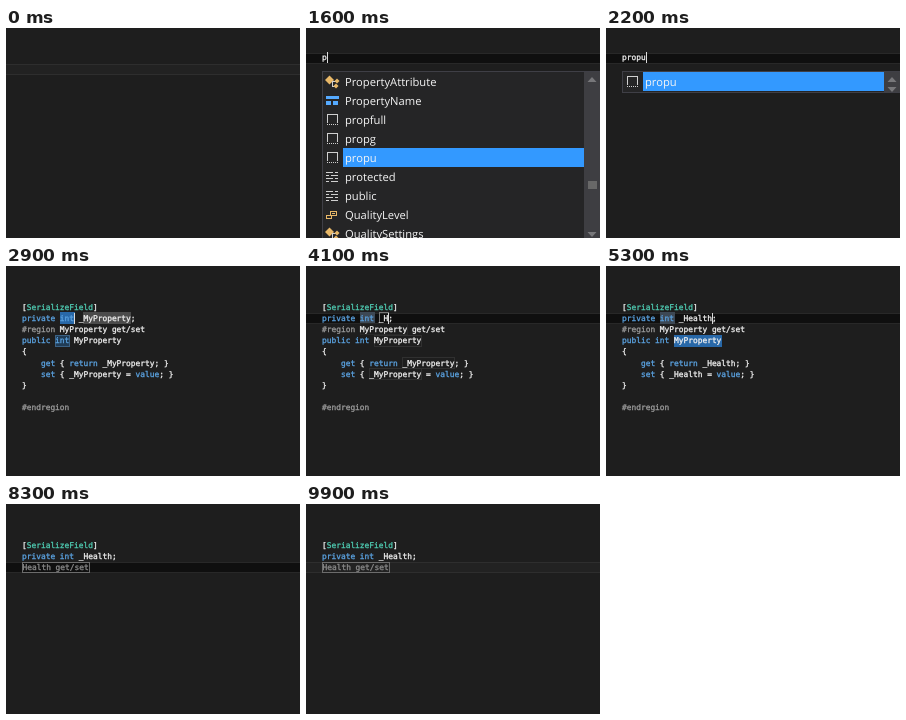
These frames come from a looping animation (294 by 210 pixels, 10000 ms). An HTML page with a canvas:

```html
<!DOCTYPE html>
<html lang="en">
<head>
<meta charset="utf-8">
<title>Property snippet</title>
<style>
  html, body { margin: 0; width: 100%; height: 100%; overflow: hidden; background: #1e1e1e; }
  canvas { display: block; }
</style>
</head>
<body>
<canvas id="stage" width="294" height="210"></canvas>
<script>
const ctx = document.getElementById('stage').getContext('2d');
const LOOP = 10000, LEFT = 16, CHAR = 4.73, LINE = 11.2;
const WHITE = '#f0f0f0', BLUE = '#5ba3e2', TEAL = '#4ec9b0', GRAY = '#9b9b9b';
const SELECTED = '#2868a8', FIELD = '#3d4854';
const ITEMS = [
  ['PropertyAttribute', 'class'], ['PropertyName', 'struct'],
  ['propfull', 'snippet'], ['propg', 'snippet'], ['propu', 'snippet'],
  ['protected', 'keyword'], ['public', 'keyword'],
  ['QualityLevel', 'enum'], ['QualitySettings', 'class']
];

const colX = col => LEFT + col * CHAR;
const lineY = (line, offset) => Math.round(offset + line * LINE);
const bandTop = line => lineY(line, 24.8);
const caretTop = line => lineY(line, 24.4);
const baseline = line => lineY(line, 32.4);
const between = (t, from, to) => t >= from && t < to;

function rect(x, y, w, h, color) {
  ctx.fillStyle = color;
  ctx.fillRect(x, y, w, h);
}

function outline(x, y, w, h, color) {
  ctx.strokeStyle = color;
  ctx.lineWidth = 1;
  ctx.strokeRect(x + .5, y + .5, w - 1, h - 1);
}

function text(str, x, y, color, font) {
  ctx.font = font;
  ctx.fillStyle = color;
  ctx.fillText(str, x, y);
}

// A thin stroke gives the small code text its weight
function code(line, str, col = 0, color = WHITE) {
  const x = colX(col), y = baseline(line);
  text(str, x, y, color, '7.86px "DejaVu Sans Mono", monospace');
  ctx.strokeStyle = color;
  ctx.lineWidth = 0.3;
  ctx.strokeText(str, x, y);
}

function colored(line, str, typesKnown) {
  const parts = str.split(/(#\w+|SerializeField|\b(?:private|public|int|return|value)\b|[gs]et(?= \{))/);
  let col = 0;
  parts.forEach((part, i) => {
    let color = WHITE;
    if (i % 2) color = part[0] === '#' ? GRAY : part[0] === 'S' ? (typesKnown ? TEAL : WHITE) : BLUE;
    code(line, part, col, color);
    col += part.length;
  });
}

function mark(line, col, length, fill, border) {
  const x = Math.round(colX(col)), w = Math.round(length * CHAR) + 1, y = bandTop(line) - 1;
  if (fill) rect(x, y, w, 12, fill);
  if (border) outline(x, y, w, 12, border);
}

function band(line, fill = '#0f0f0f', edge = '#282828') {
  rect(0, bandTop(line), 294, 11, edge);
  rect(0, bandTop(line) + 1, 294, 9, fill);
}

function idleBand(line) {
  band(line, '#222222', '#2e2e2e');
}

function caret(line, col) {
  rect(Math.round(colX(col)), caretTop(line), 1, 11, '#dcdcdc');
}

function diamond(x, y, r, color) {
  ctx.fillStyle = color;
  ctx.beginPath();
  ctx.moveTo(x, y - r); ctx.lineTo(x + r, y); ctx.lineTo(x, y + r); ctx.lineTo(x - r, y);
  ctx.fill();
}

function icon(kind, y) {
  const orange = '#e8b868', light = '#d0d0d0', sky = '#55aaff';
  if (kind === 'class') {
    diamond(23.5, y - 2, 4.5, orange);
    rect(26, y - 1, 4, 1, light);
    rect(26, y - 1, 1, 5, light);
    rect(26, y + 4, 3, 1, light);
    diamond(31, y - 1, 2.5, orange);
    diamond(30, y + 4, 2.5, orange);
  } else if (kind === 'struct') {
    rect(20, y - 5, 13, 3, sky);
    rect(20, y, 5, 4, sky);
    rect(27, y, 5, 4, sky);
  } else if (kind === 'snippet') {
    rect(21, y - 6, 11, 1, light);
    rect(21, y - 6, 1, 9, light);
    rect(31, y - 6, 1, 9, light);
    for (let x = 21; x < 32; x += 2) rect(x, y + 4, 1, 1, light);
  } else if (kind === 'keyword') {
    for (let i = 0; i < 4; i++) {
      const gap = i % 2 ? 3 : 7;
      rect(20, y - 5 + i * 3, gap, 1, light);
      rect(22 + gap, y - 5 + i * 3, 10 - gap, 1, light);
    }
  } else {
    rect(24, y - 4, 7, 5, orange);
    rect(25, y - 3, 5, 3, '#252526');
    rect(26, y - 2, 3, 1, orange);
    rect(20, y, 6, 4, orange);
    rect(21, y + 1, 4, 2, '#252526');
  }
}

function arrow(y, dir) {
  ctx.fillStyle = '#77777a';
  ctx.beginPath();
  ctx.moveTo(281.5, y + 2 * dir); ctx.lineTo(290.5, y + 2 * dir); ctx.lineTo(286, y - 3 * dir);
  ctx.fill();
}

function popup(items, height) {
  rect(16, 43, 278, height, '#252526');
  outline(16, 43, 290, height, '#3f3f46');
  rect(278, 44, 16, height - 2, '#3e3e42');
  arrow(52, 1);
  if (items.length > 1) {
    rect(282, 153, 9, 8, '#686868');
    arrow(206, -1);
  } else arrow(61, -1);
  items.forEach(([name, kind], i) => {
    const y = 54 + i * 19;
    if (name === 'propu') rect(37, y - 10, 241, 19, '#3399ff');
    icon(kind, y);
    text(name, 39, y + 4, '#f4f4f4', '11.2px "Open Sans", sans-serif');
  });
}

function completion(t) {
  band(0);
  const typed = t < 2200 ? 'prop'.slice(0, Math.max(0, Math.floor((t - 1500) / 100))) : 'propu';
  code(0, typed);
  if (t < 1000 || t >= 1500) caret(0, typed.length);
  if (between(t, 1600, 2200)) popup(ITEMS, 180);
  else if (between(t, 2200, 2400)) popup([ITEMS[4]], 22);
}

// Number of letters of "_Health" typed so far
const typedLength = t => [3900, 4100, 4400, 4500, 4700, 4900, 5000].filter(at => t >= at).length;

function snippet(t) {
  const field = t < 3900 ? '_MyProperty' : '_Health'.slice(0, typedLength(t));
  const linked = t < 5300 ? '_MyProperty' : '_Health';
  const name = t < 5400 ? 'MyProperty' : 'Health';

  if (between(t, 3900, 6100)) band(2);
  else if (t >= 6100) band(9);

  if (t < 3500) {
    mark(2, 8, 3, SELECTED);
    mark(2, 13, 10, '#4b4b4b');
    if (t >= 2900) mark(4, 7, 3, '#203c56', '#3b6184');
  } else if (t < 5500) {
    mark(2, 8, 3, FIELD);
    if (t < 3900) mark(2, 12, 11, SELECTED);
    else if (t < 5300) mark(2, 12, field.length, null, '#777777');
  }
  if (between(t, 3000, 5300)) {
    mark(3, 8, 10, null, '#292929');
    mark(4, 11, 10, null, '#303030');
  }
  if (between(t, 3600, 5300)) {
    mark(6, 17, 11, null, '#303030');
    mark(7, 10, 11, null, '#303030');
  }
  if (between(t, 5300, 5400)) mark(4, 11, 10, SELECTED);
  if (between(t, 5800, 6100)) {
    mark(2, 12, 7, '#303030');
    mark(6, 17, 7, '#303030');
    mark(7, 10, 7, '#303030');
  }

  [
    '[SerializeField]',
    `private int ${field};`,
    `#region ${name} get/set`,
    `public int ${name}`,
    '{',
    `    get { return ${linked}; }`,
    `    set { ${linked} = value; }`,
    '}',
    '',
    '#endregion'
  ].forEach((str, i) => colored(i + 1, str, t >= 2900));

  if (t < 3500) caret(2, 11);
  else if (between(t, 3900, 6100)) caret(2, 12 + field.length);
  else if (between(t, 6100, 6400)) caret(9, 0);
}

function collapsed(t) {
  if (t < 9900) band(3);
  else idleBand(3);
  colored(1, '[SerializeField]', true);
  colored(2, 'private int _Health;', true);
  outline(16, 58, 68, 11, '#6c6c6c');
  code(3, 'Health get/set', 0.1, '#8c8c8c');
  const blinkOn = t < 7300 || Math.floor((t - 7300) / 500) % 2 === 1;
  if (blinkOn && t < 9900) caret(3, 0);
}

function draw(t) {
  rect(0, 0, 294, 210, '#1e1e1e');
  if (t < 600) idleBand(1);
  else if (t < 2600) completion(t);
  else if (t < 7100) snippet(t);
  else collapsed(t);
}

function tick() {
  draw(performance.now() % LOOP);
  requestAnimationFrame(tick);
}

ctx.textRendering = 'geometricPrecision';
tick();
</script>
</body>
</html>
```
